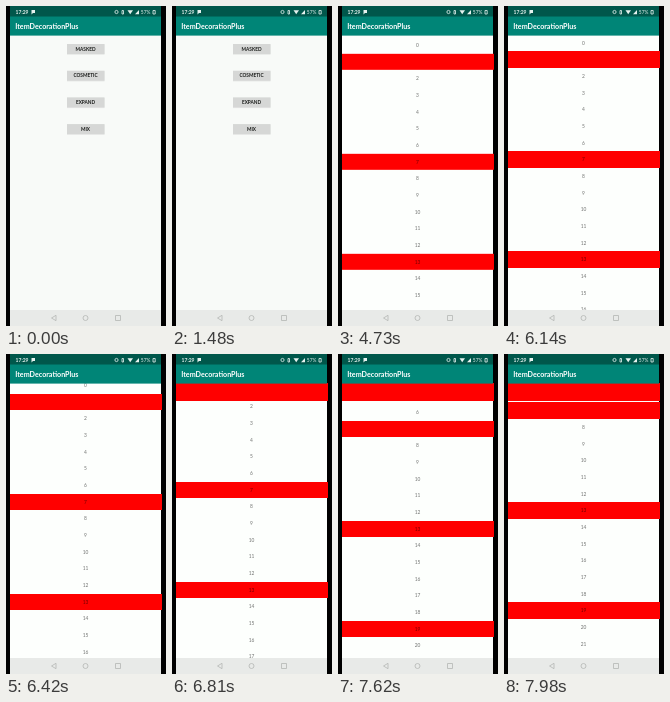
Animation of 160 by 320 pixels, one loop 8 s. Source, as an HTML page with a canvas:

```html
<!DOCTYPE html>
<html lang="en">
<head>
<meta charset="utf-8">
<title>ItemDecorationPlus</title>
<style>
html, body { margin: 0; width: 100%; height: 100%; overflow: hidden; background: #000; }
canvas { display: block; }
</style>
</head>
<body>
<canvas id="stage" width="160" height="320"></canvas>
<script>
const ctx = document.getElementById('stage').getContext('2d');
const LOOP = 8000, LEFT = 4, WIDTH = 151, TOP = 30, BOTTOM = 304, MID = 79.5;
const ROW = 50 / 3, ROWS = 40;
const FONT = 'Lato, Roboto, sans-serif';

// time in ms, offset in px, speed in px/ms
const SCROLL = [
  [6110, 0, 0.03], [6140, 1.3, 0.025], [6810, 19, 0.05],
  [7620, 80, 0.068], [7980, 98.4, 0.045], [8000, 99.3, 0.045]
];

const clamp = v => Math.max(0, Math.min(1, v));

function rect(color, x, y, w, h) {
  ctx.fillStyle = color;
  ctx.fillRect(x, y, w, h);
}

function text(str, x, y, size, color, weight = 400, align = 'center') {
  ctx.font = `${weight} ${size}px ${FONT}`;
  ctx.textAlign = align;
  ctx.textBaseline = 'alphabetic';
  ctx.fillStyle = color;
  ctx.fillText(str, x, y + size * 0.36);
}

function path(points, color, fill) {
  ctx.beginPath();
  points.forEach(([x, y]) => ctx.lineTo(x, y));
  ctx.closePath();
  ctx.fillStyle = ctx.strokeStyle = color;
  fill ? ctx.fill() : ctx.stroke();
}

function ring(x, y, r, color) {
  ctx.beginPath();
  ctx.arc(x, y, r, 0, 7);
  ctx.strokeStyle = color;
  ctx.stroke();
}

function scrollAt(t) {
  if (t <= SCROLL[0][0]) return 0;
  const i = SCROLL.findIndex(k => t <= k[0]);
  const [t0, y0, v0] = SCROLL[i - 1], [t1, y1, v1] = SCROLL[i];
  const d = t1 - t0, u = (t - t0) / d, u2 = u * u, u3 = u2 * u;
  return y0 * (2 * u3 - 3 * u2 + 1) + v0 * d * (u3 - 2 * u2 + u)
    + y1 * (3 * u2 - 2 * u3) + v1 * d * (u3 - u2);
}

function drawMenu(t) {
  rect('#f8faf8', LEFT, TOP - 1, WIDTH, BOTTOM - TOP + 1);
  ['MASKED', 'COSMETIC', 'EXPAND', 'MIX'].forEach((label, i) => {
    const y = 43 + i * 26.7;
    rect('rgba(0,0,0,.08)', 61, y - 4.5, 37.5, 10.2);
    rect('#d6d7d6', 61, y - 5, 37.5, 10);
    const press = clamp((t - 4220) / 200);
    if (i === 0 && press > 0) {
      ctx.save();
      ctx.beginPath();
      ctx.rect(61, y - 5, 37.5, 10);
      ctx.clip();
      ctx.beginPath();
      ctx.arc(MID, y, 3 + 18 * press, 0, 7);
      ctx.fillStyle = 'rgba(0,0,0,.12)';
      ctx.fill();
      ctx.restore();
    }
    text(label, MID, y, 4.75, '#1c1e1c', 700);
  });
}

// red bands sit on whole pixels
function band(y) {
  const top = Math.round(y);
  rect('#f00', LEFT, top, WIDTH + 1, Math.round(y + ROW) - top);
}

function drawList(scroll) {
  rect('#fdfffd', LEFT, TOP - 1, WIDTH, BOTTOM - TOP + 1);
  for (let i = 0; i < ROWS; i++) {
    const y = TOP + i * ROW - scroll;
    if (y < TOP - ROW || y > BOTTOM) continue;
    const red = i % 6 === 1;
    if (red) band(y);
    // headers close to the pinned one hide their number
    if (!red || y > 85) text(i, MID, y + ROW / 2, 4.86, 'rgba(0,0,0,.56)');
  }
  if (scroll >= ROW) {
    rect('#f00', LEFT, TOP - 1, WIDTH + 1, 1);
    band(TOP);
  }
}

function drawBars() {
  rect('#008577', LEFT, 10, WIDTH, 19.6);
  rect('#00574b', LEFT, 0, WIDTH, 10.5);
  text('ItemDecorationPlus', 9.2, 20.6, 7.15, '#fff', 700, 'left');

  const ink = '#e6f2ef';
  ctx.lineWidth = 0.8;
  text('17:29', 9.6, 6, 5, ink, 700, 'left');
  path([[25.5, 4], [29, 4], [29, 7], [27, 7], [25.5, 8.5]], ink, true);
  ring(110.5, 6, 1.6, ink);
  path([[116, 4.5], [117.5, 4.5], [117.5, 8], [116, 8]], ink);
  path([[121.5, 4.2], [127, 4.2], [124.2, 8.3]], ink, true);
  path([[129, 8.2], [133, 8.2], [133, 4]], ink, true);
  text('57%', 134.8, 6, 4.9, ink, 400, 'left');
  path([[147, 4.5], [149.2, 4.5], [149.2, 8], [147, 8]], ink);

  rect('#e8eae8', LEFT, BOTTOM, WIDTH, 16);
  const gray = '#b4b6b4';
  path([[45.5, 312], [50, 309.3], [50, 314.7]], gray);
  ring(MID, 312, 2.5, gray);
  path([[109.5, 309.5], [114.5, 309.5], [114.5, 314.5], [109.5, 314.5]], gray);
}

function draw(t) {
  rect('#000', 0, 0, 160, 320);
  ctx.save();
  ctx.beginPath();
  ctx.rect(LEFT, TOP - 1, WIDTH + 1, BOTTOM - TOP + 1);
  ctx.clip();
  const open = clamp((t - 4420) / 460);
  if (open < 1) drawMenu(t);
  if (open > 0) {
    ctx.globalAlpha = clamp(open * 1.7);
    ctx.translate(0, 24 * (1 - open) ** 3);
    drawList(scrollAt(t));
  }
  ctx.restore();
  drawBars();
}

const start = performance.now();
function tick() {
  draw((performance.now() - start) % LOOP);
  requestAnimationFrame(tick);
}
tick();
</script>
</body>
</html>
```
